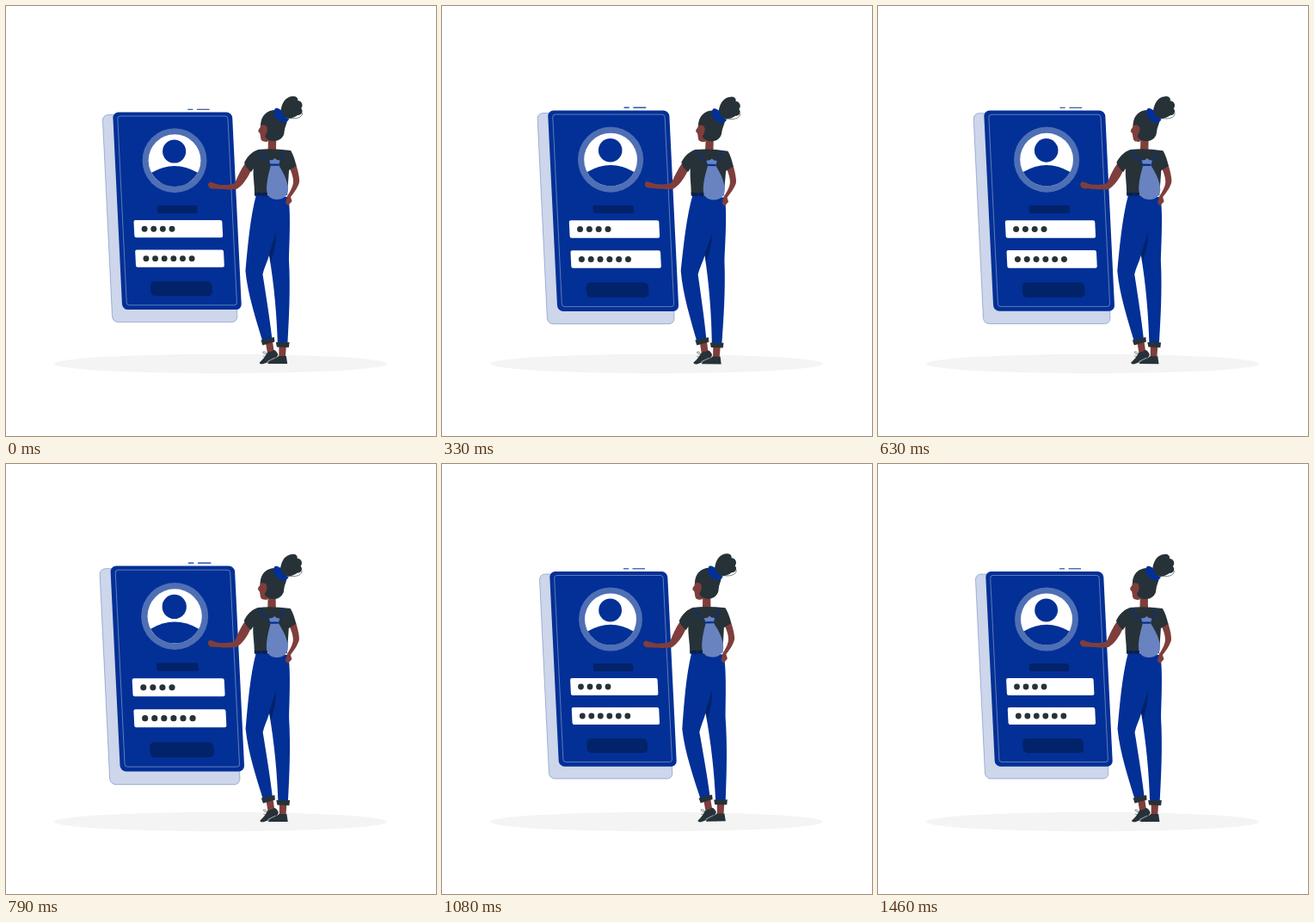
Write an HTML page that moves like this. It is 500x500 px and loops after 1.5 s.

```html
<!DOCTYPE html>
<html lang="en">
<head>
<meta charset="utf-8">
<title>Login card</title>
<style>
  html, body { margin: 0; width: 100%; height: 100%; overflow: hidden; background: #fff; }
  svg { display: block; width: 100vw; height: 100vh; }
  .blue { fill: #033096; }
  .dark { fill: #263238; }
  .skin { fill: #7f3e3b; }
  .navy { fill: #022269; }
  .pale { fill: #6883c0; }
  .white { fill: #fff; }
  .line { fill: none; stroke: #263238; stroke-width: .6; }
</style>
</head>
<body>
<svg viewBox="0 0 500 500">
  <ellipse cx="249.5" cy="416" rx="193.5" ry="11.2" fill="#f4f4f4"/>

  <g id="card">
    <path d="M211 121.8h6M221.5 121.8h14.5" stroke="#033096" stroke-width="1"/>
    <g transform="matrix(1 0 .0485 1 -6.06 0)">
      <rect x="113" y="128" width="143.5" height="238" rx="6.5" fill="#cdd6ea" stroke="#033096" stroke-width=".3"/>
      <rect class="blue" x="125" y="125" width="137" height="226.7" rx="6.5"/>
      <rect x="130.3" y="129.5" width="126.5" height="217" rx="3" fill="none" stroke="#fff" stroke-width=".5" opacity=".7"/>
      <rect class="navy" x="170.7" y="232" width="46" height="9" rx="2"/>
      <rect class="white" x="143" y="249" width="101.5" height="20" rx="2"/>
      <rect class="white" x="143" y="283" width="101.5" height="20" rx="2"/>
      <rect class="navy" x="158.7" y="319.3" width="70.5" height="16.7" rx="5"/>
    </g>
    <circle cx="196" cy="180.5" r="37" fill="#4f6fb5"/>
    <circle class="white" cx="196" cy="180.5" r="30"/>
    <circle class="blue" cx="195.6" cy="170" r="13.4"/>
    <path class="blue" d="M169.5 194.5Q196 179 222.5 194.5A30 30 0 0 1 169.5 194.5Z"/>
    <g id="dots" class="dark"></g>
  </g>

  <g id="person">
    <!-- legs and shoes -->
    <path class="skin" d="M302 391L310 389L312 403H304ZM317.500 395H326L325 409H317.500Z"/>
    <path class="dark" d="M295 414.500C299 411 302 407 304 403C306 401.500 309 402.500 311 400C313.500 400 315 402 316.500 405C316 408 313 411 308 413L299 416.300C296 416.500 295 416 295 414.500Z"/>
    <path d="M304 413.500L313 409" stroke="#fff" stroke-width=".6"/>
    <path class="dark" d="M304.500 415.800C304.500 412.500 313 411.500 317 407H326L327.300 416H304.500Z"/>
    <path class="line" d="M304 405C300 405 297 402 300 402C302 402 303 404 304 405C302 408 300 408 299 407"/>
    <path class="blue" d="M291 219L328 222C331 235 330 265 329 295C331 330 329 365 327.500 393L316 392C315 360 312 325 306 290C304 297 300 305 298.500 312C303 340 307 365 309.500 387L298.500 390C291 365 281 335 278.500 308C281 280 284 245 291 219Z"/>
    <path class="navy" d="M314 264L306 288L308 297C312 285 314 275 314 264Z"/>
    <path class="dark" d="M296.500 388.500L312 385L312.500 390.500L298.500 394.500ZM314 391H329.700L329 397L315 396.500Z"/>

    <!-- arms and torso -->
    <path class="skin" d="M278 183L285 191C281 200 275 209 268 213C260 214 248 213 243 212.500C240 213 236 212 235.500 210C234 207 236 204 239 205C242 206 245 207.500 250 208C256 208 262 208 266 206C269 199 273 190 278 183Z"/>
    <path class="skin" d="M330 189L337 184C340 193 341.500 201 341 205C339 212 334 218 331 222L332.500 227L328 232L325 229L327 221C331 215 334 209 334 204C334 199 332 194 330 189Z"/>
    <path class="skin" d="M305 152H314V168H304.500Z"/>
    <path class="dark" d="M293 167Q309 165 331 168C334 173 336 179 337.500 186L329 191L327 220L289 218.500C289 208 287 198 287.500 189L285 193C281 190 278 186 277 182C281 174 287 169 293 167Z"/>
    <path d="M289 217H304V220.700H289Z" fill="#0a1f4a"/>
    <path class="blue" d="M297 217h1v3.700h-1z"/>

    <!-- bag -->
    <path d="M308 181Q298 178 295 168M317 181Q324 178 322 168" fill="none" stroke="#033096" stroke-width="1.200"/>
    <path class="pale" d="M306 179.500L310 179L312.500 177L315 179L318.500 179.500L317 185C320 190 328 202 328 213C328 221 322 225 315 225C308 225 303 221 303 213C303 203 306 192 308 185Z"/>
    <path class="blue" d="M307.500 183.500H317V185.800H307.500Z"/>

    <!-- head -->
    <path class="skin" d="M296.500 136L304 136L308 152L304 157.800C299 158.300 296.200 157 296 153L295.300 148.500L293 145.500L295.300 141.500Z"/>
    <path class="line" d="M293.500 143.500L295.500 142.800"/>
    <path class="dark" d="M296 139C296 127 304 121 313 121C318 122 323 129 327 133C326 138 324 141 323.500 146C323.500 152 318 157.500 311 157C305 157 302 154 301 151C304 147 305 142 302 139C300 138 298 138 296 139Z"/>
    <path class="dark" d="M319 128C319 118 322 106 333 105C338 104 340 108 339 110C344 110 346 116 343 119C346 122 344 127 339 127C334 131 326 132 319 129Z"/>
    <path class="line" d="M328 130C336 132 345 130 344.500 124"/>
    <path class="blue" d="M313 119C316 118 321 121 321 124C322 128 326 131 329 131C328 135 323 136 321 135C315 133 308 126 313 119Z"/>
  </g>
</svg>
<script>
  const LOOP = 1500, FPS = 24;
  const byId = id => document.getElementById(id);
  const card = byId('card'), person = byId('person');

  const dotRow = (x, y, count) => Array.from({ length: count }, (_, i) =>
    `<circle cx="${x + i * 10.5}" cy="${y}" r="3.4"/>`).join('');
  byId('dots').innerHTML = dotRow(161.5, 259, 4) + dotRow(163.3, 293, 6);

  // Linear interpolation through [position, value] pairs.
  function track(keys, p) {
    const i = keys.findIndex(k => k[0] > p);
    const [p0, v0] = keys[i - 1], [p1, v1] = keys[i];
    return v0 + (v1 - v0) * (p - p0) / (p1 - p0);
  }
  const PULSE = [[0, 1], [.1, 1.094], [.3, 1], [.4, 1], [.5, 1.094], [.6, 1], [1, 1]];
  const SWAY = [[0, 0], [.25, 1], [.75, -1], [1, 0]];

  function draw(now) {
    const step = Math.floor((now % LOOP + 4) * FPS / 1000);
    const phase = (step + .5) * 1000 / FPS / LOOP % 1;
    card.setAttribute('transform',
      `translate(193 244) scale(${track(PULSE, phase)}) translate(-193 -244)`);
    person.setAttribute('transform', `rotate(${track(SWAY, phase)} 290 260)`);
  }

  const start = performance.now();
  function tick() {
    draw(performance.now() - start);
    requestAnimationFrame(tick);
  }
  tick();
</script>
</body>
</html>
```
